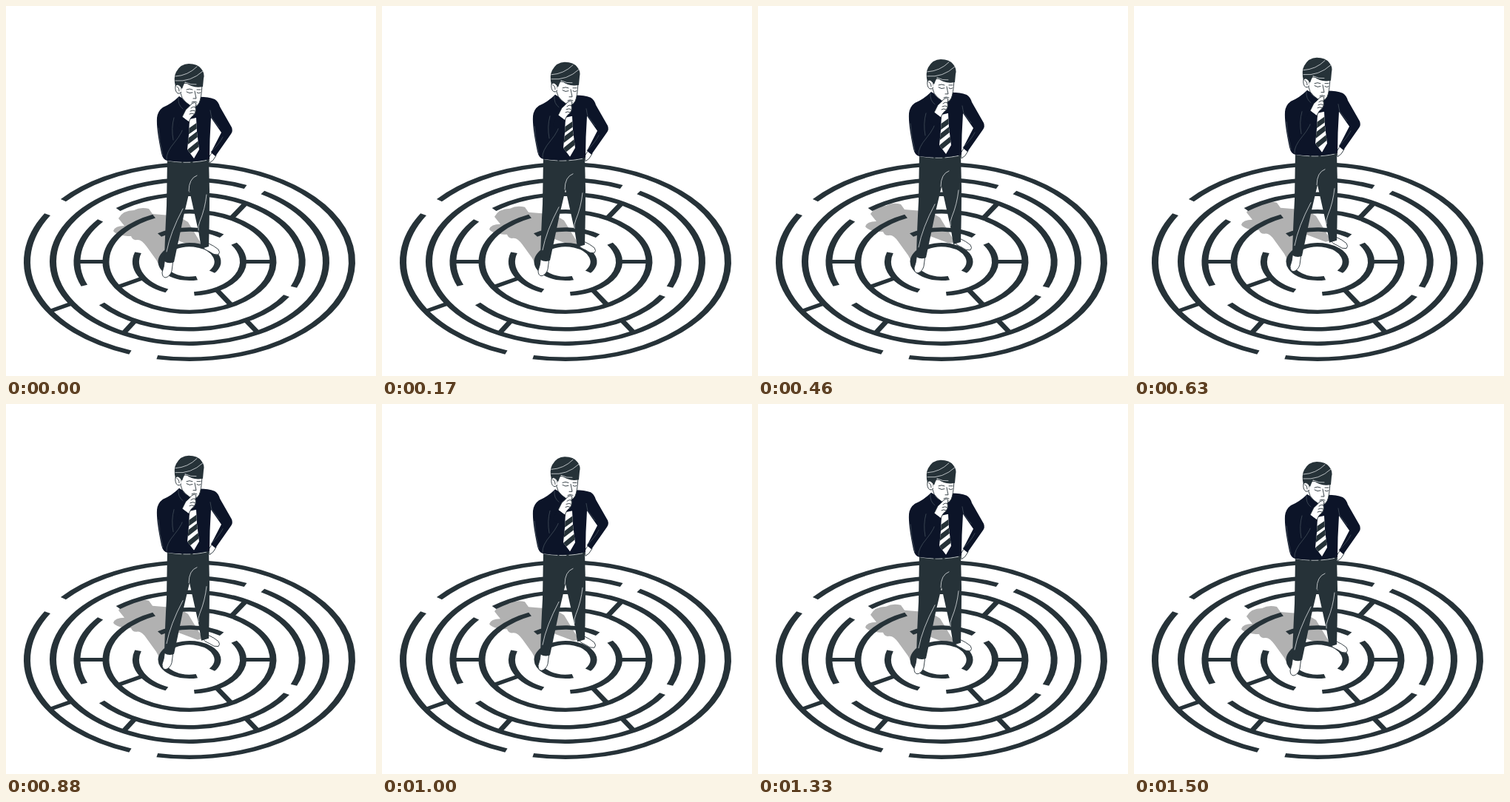
These frames come from a looping animation (500 by 500 pixels, 1.54 s). An HTML page:

```html
<!DOCTYPE html>
<html lang="en">
<head>
<meta charset="utf-8">
<title>Thinking in the maze</title>
<style>
  html, body { margin: 0; width: 100%; height: 100%; overflow: hidden; background: #fff; }
  svg { display: block; width: 100%; height: 100%; }
  .dark { fill: #263238; }
  .navy { fill: #0c1428; }
  .skin { fill: #fff; stroke: #263238; stroke-width: .9; stroke-linejoin: round; }
  .ink { fill: none; stroke: #263238; stroke-width: .9; stroke-linecap: round; }
  .fold { fill: none; stroke: #4b5862; stroke-width: .7; stroke-linecap: round; }
  .light { fill: none; stroke: #dfe3e5; stroke-width: .8; stroke-linecap: round; }
  #maze { fill: none; stroke: #263238; stroke-width: 9; }
</style>
</head>
<body>
<svg viewBox="0 0 500 500">
  <defs>
    <clipPath id="tie"><path d="M248 153 L257 151 L258 170 L261 194 L254 206 L245 194 L247 174 Z"/></clipPath>
  </defs>

  <g class="float" fill="#b1b1b1">
    <path d="M213 362 L203 343 L190 325 Q183 315 177 316 Q171 317 169 311 Q150 311 145 304 Q147 297 160 297 Q155 291 152 287 Q158 276 173 276 Q182 271 193 274 L198 281 L222 283 L222 345 Z"/>
    <path d="M236 286 L246 292 L266 325 L259 327 L230 316 Z"/>
  </g>

  <g id="maze" transform="translate(248 345.5) scale(1 .6)"></g>

  <g class="float">
    <!-- feet -->
    <path class="skin" d="M214.500 343 Q214 352 211 360 Q211 367 216 367 Q222 365 224 358 L226 343 Z"/>
    <path class="skin" d="M265 324 Q268 330 275 332 Q281 337 287 336 Q290 333 287 329 Q281 324 274 321 Z"/>
    <!-- trousers -->
    <path class="dark" d="M218 207 Q247 213 274 206 L275 250 Q275 290 274 325 L264 328 Q261 306 256 286 L248 250 L240 284 Q233 318 227 346 Q220 349 214 345 Q215 305 217 270 Z"/>
    <path class="light" d="M219 209 Q247 214 273 208" stroke-dasharray="18 3 9 4"/>
    <path class="light" d="M247 250 Q247 233 258 229 M239 274 Q222 306 217 332 M271 255 Q269 274 262 291 Q259 298 260 303"/>
    <!-- hand on hip -->
    <path class="skin" d="M281 196 Q276 200 274 205 L275 212 Q280 210 284 202 Z"/>
    <!-- shirt -->
    <path class="navy" d="M234 122 Q245 130 256 123 Q271 122 282 126 Q287 129 289 136 L305 164 Q307 169 304 173 L283 203 L277 198 L291 171 L277 151 Q275 180 275 207 Q247 213 218 209 Q212 208 210 199 Q203 166 204 151 Q205 142 212 137 Q224 132 234 122 Z"/>
    <path class="fold" d="M227 151 Q223 165 226 181 M217 207 Q216 198 228 184 Q239 171 242 157 M206 165 Q207 184 212 202 M276 141 Q277 147 278 151 L288 164 M277 197 Q288 187 293 177 M233 124 Q232 134 239 139"/>
    <!-- tie -->
    <g clip-path="url(#tie)">
      <path fill="#fff" d="M243 148 H264 V209 H243 Z"/>
      <path d="M242 173 L263 158 M242 186 L264 169 M242 201 L264 183" stroke="#263238" stroke-width="6.500"/>
    </g>
    <!-- head -->
    <path class="skin" d="M237 104 L236 118 Q237 125 243 130 L251 136 Q257 138 261 131 Q264 125 265 106 Z"/>
    <path class="skin" d="M236 109 Q231 104 229 108 Q228 115 232 118 Q235 119 237 116"/>
    <path class="ink" d="M231 109 Q234 110 234 115 M244 116 Q248 119 252 117 M258 117 Q261 119 263 117 M244 113 Q248 111 252 113 M258 113 L263 113 M255 115 L257 125 L253 125 M251 130 Q254 128 258 130"/>
    <path class="dark" d="M229 109 Q226 96 230 89 Q236 78 247 78 Q259 78 264 85 Q269 91 267 98 L266 109 Q253 112 242 103 Q240 106 238 112 L235 108 Q231 104 229 109 Z"/>
    <path class="light" d="M229 101 Q250 103 266 88 M229 95 Q246 94 258 82 M242 103 Q250 107 257 106"/>
    <!-- hand at chin -->
    <path class="skin" d="M238 150 Q241 144 243 140 Q248 136 251 132 Q255 129 257 132 L256 137 Q258 142 254 147 Q249 150 247 157 Z"/>
    <path class="ink" d="M250 138 Q254 135 256 137 M249 142 Q253 140 256 142 M248 146 Q251 144 254 146"/>
    <path class="navy" d="M237 149 L248 157 L242 170 L231 163 Z"/>
  </g>
</svg>
<script>
  const maze = document.getElementById('maze');
  const point = (r, deg) => {
    const a = deg * Math.PI / 180;
    return (r * Math.cos(a)).toFixed(2) + ' ' + (r * Math.sin(a)).toFixed(2);
  };
  const addPath = (d, width) => {
    const p = document.createElementNS('http://www.w3.org/2000/svg', 'path');
    p.setAttribute('d', d);
    if (width) p.setAttribute('stroke-width', width);
    maze.append(p);
  };

  // radius, then start and end angle of each wall
  const rings = [
    [219.5, [219, 461.5], [111.4, 209]],
    [184.5, [-57.6, 294.2]],
    [152, [230.6, 382], [30.4, 141.3], [159.3, 217.6]],
    [113, [260, 604.9]],
    [72.5, [-34, 85], [115, 196.5], [236, 307]],
    [38, [75, 397]]
  ];
  for (const [r, ...walls] of rings)
    for (const [from, to] of walls)
      addPath(`M${point(r, from)} A${r} ${r} 0 ${to - from > 180 ? 1 : 0} 1 ${point(r, to)}`);

  // outer ring index and angle of each spoke
  const spokes = [[0, 149.4], [1, 119], [1, 60], [2, -60], [2, 180], [3, 0], [3, 149.6], [3, 60]];
  for (const [i, deg] of spokes)
    addPath(`M${point(rings[i][0], deg)} L${point(rings[i + 1][0], deg)}`, 8);

  const LOOP = 1540, STEP = 1000 / 24, HALF = 18, RISE = 10;
  const floats = document.querySelectorAll('.float');
  const start = performance.now();

  function draw(now) {
    const t = Math.max(0, now - start) % LOOP;
    const n = Math.min(2 * HALF, Math.floor((t + 4) / STEP));
    const y = -RISE * (1 - Math.abs(1 - n / HALF));
    for (const g of floats) g.setAttribute('transform', `translate(0 ${y.toFixed(3)})`);
    requestAnimationFrame(draw);
  }
  draw(start);
</script>
</body>
</html>
```
